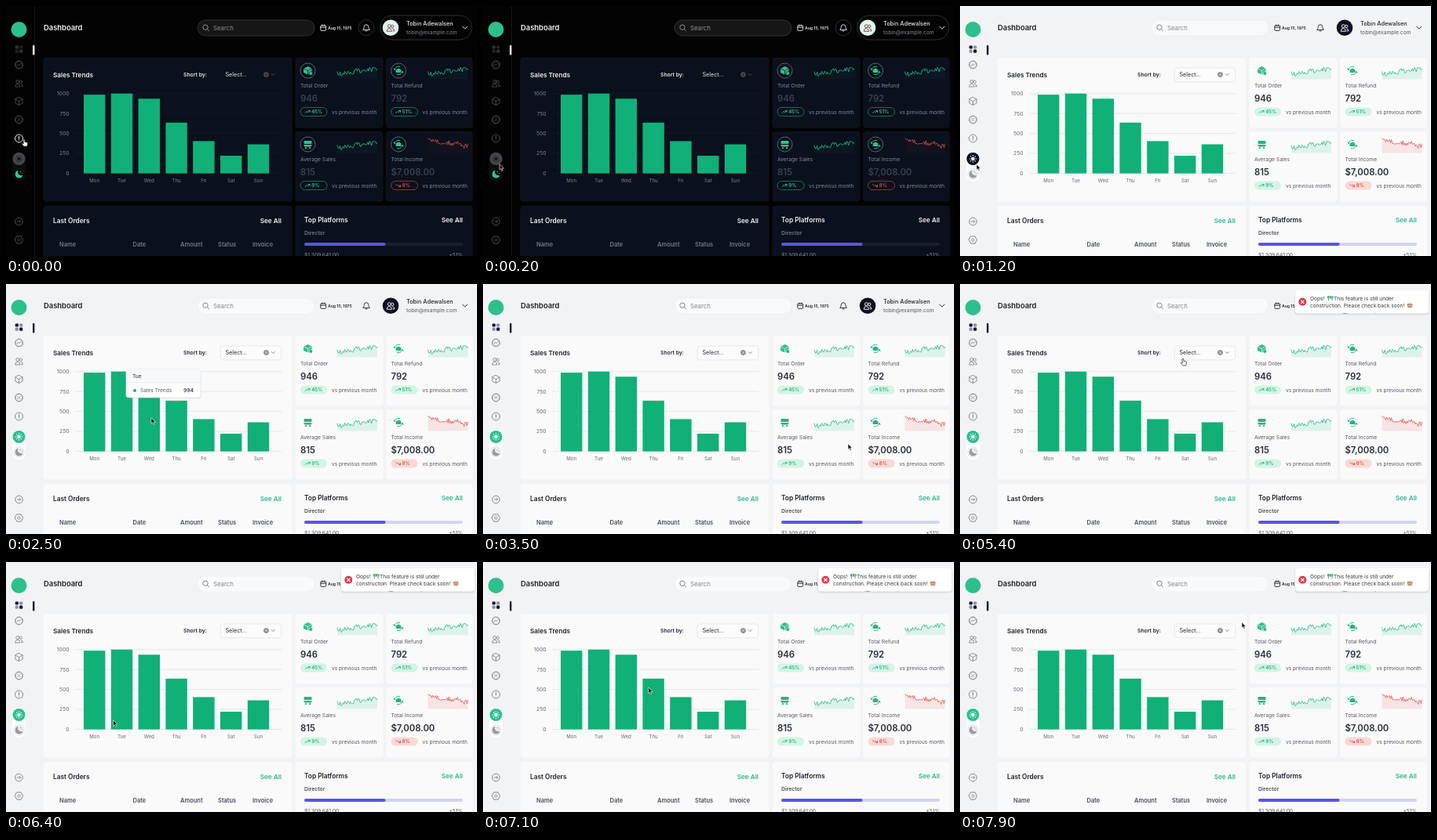
Animation, 600 px wide and 319 px high, one loop 8 s. Source, as an HTML page:

```html
<!DOCTYPE html>
<html lang="en">
<head>
<meta charset="utf-8">
<title>Dashboard</title>
<style>
html, body { margin: 0; width: 100%; height: 100%; overflow: hidden; }
svg { display: block; width: 100%; height: 100%; font-family: Inter, "Open Sans", sans-serif;
  --bg: #f2f3f5; --card: #fafafb; --edge: #fafafb; --ink: #23262f; --title: #1f2229; --sub: #55585f;
  --num: #2a2d3c; --axis: #666a70; --head: #4a4e57; --link: #2db88c; --grid: #e2e4e7; --icon: #85888d;
  --line: transparent; --field: #f9fafb; --fieldEdge: #eeeff1; --hint: #85888e; --ring: transparent;
  --pick: #fcfcfd; --pickEdge: #e2e4e8; --up: #22b582; --upBg: #d3f4e6; --upEdge: transparent;
  --down: #dc5145; --downBg: #f9d9d5; --downEdge: transparent; --fade: .13; --track: #d3d3f2;
  --avatar: #0e1022; --face: #fff; --tabA: #14162b; --tabB: #8e8fa8; --mark: #14162b;
  --pill: #fff; --sunBg: #2cc08d; --sun: #fff; --moon: #9a9ca0; --moonBg: #eeeef0; --hot: #85888d; }
svg.dark {
  --bg: #030304; --card: #0a101c; --edge: #121824; --ink: #e8e9ec; --title: #f0f1f3; --sub: #858a94;
  --num: #3a404e; --axis: #7d828c; --head: #737985; --link: #f0f1f3; --grid: #151b27; --icon: #4a4b4d;
  --line: #1d1d1e; --field: #161617; --fieldEdge: #39393a; --hint: #8b8c8f; --ring: #737780;
  --pick: transparent; --pickEdge: transparent; --up: #27c78e; --upBg: transparent; --upEdge: #1c8763;
  --down: #d8574c; --downBg: transparent; --downEdge: #a3423c; --fade: .04; --track: #1a1e2a;
  --avatar: #dff6ec; --face: #843c46; --tabA: #303133; --tabB: #202123; --mark: #f2f2f2;
  --pill: #0c0c0d; --sunBg: #454648; --sun: #17181a; --moon: #2cc892; --moonBg: transparent; --hot: #f0f0f0; }
</style>
</head>
<body>
<svg id="stage" viewBox="0 0 600 319" preserveAspectRatio="none"></svg>
<script>
const col = c => /^[a-z]+$/i.test(c) && c !== 'none' ? `var(--${c})` : c;
const paint = (fill, stroke = 'none', w = 1) =>
  `style="fill:${col(fill)};stroke:${col(stroke)};stroke-width:${w}"`;
const rect = (x, y, w, h, r, ...p) =>
  `<rect x="${x}" y="${y}" width="${w}" height="${h}" rx="${r}" ${paint(...p)}/>`;
const circle = (x, y, r, ...p) => `<circle cx="${x}" cy="${y}" r="${r}" ${paint(...p)}/>`;
const path = (d, ...p) => `<path d="${d}" stroke-linecap="round" stroke-linejoin="round" ${paint(...p)}/>`;
const text = (x, y, size, fill, str, weight = 400, anchor = 'start') =>
  `<text x="${x}" y="${y}" font-size="${size}" font-weight="${weight}" text-anchor="${anchor}" ${paint(fill)}>${str}</text>`;
const at = (x, y, body) => `<g transform="translate(${x} ${y})">${body}</g>`;
const chevron = (x, y, s, c) => path(`M${x - s} ${y - s / 2}l${s} ${s} ${s} ${-s}`, 'none', c, 1);

// Outline icons, centred on 0,0
const scallop = c => circle(0, 0, 4.6, 'none', c, 1) + circle(0, 0, 5.1, 'none', c, .5);
const users = c => circle(-1.7, -2, 2, 'none', c, .9) + circle(2.2, -1.8, 1.7, 'none', c, .9) +
  path('M-4.8 4.2q0-3.4 3.1-3.4t3.1 3.4zM2.6 1.2q2.4.4 2.3 3H3', 'none', c, .9);
const box = c => path('M0-5L4.6-2.6V2.6L0 5-4.6 2.6V-2.6ZM-4.6-2.6L0 0 4.6-2.6M0 0V5', 'none', c, .9);
const icons = {
  chart: c => scallop(c) + path('M-2.5 1.3L-.8-.8 .7.6 2.5-1.5', 'none', c, .9),
  users, box,
  percent: c => scallop(c) + path('M-1.7 1.7L1.7-1.7', 'none', c, .9) +
    circle(-1.4, -1.3, .6, c) + circle(1.4, 1.3, .6, c),
  clock: c => circle(0, 0, 5, 'none', c, 1) + path('M0-2.6V.4M0 2.1V2.2', 'none', c, 1.1),
  arrow: c => circle(0, 0, 4.8, 'none', c, 1) + path('M-2.2 0H2.2M.6-1.7L2.3 0 .6 1.7', 'none', c, .9),
  gear: c => path('M-2.6-4.6H2.6L5.2 0 2.6 4.6H-2.6L-5.2 0Z', 'none', c, 1) + circle(0, 0, 1.7, 'none', c, .9)
};

function sidebar() {
  let out = rect(36, 0, .8, 319, 0, 'line') + circle(16.5, 30, 10, '#2ec08c');
  for (let i = 0; i < 4; i++)
    out += rect(11.7 + i % 2 * 5.4, 50.4 + (i >> 1) * 5.2, 4.2, 4.2, 1.3, i % 3 ? 'tabB' : 'tabA');
  out += rect(34, 50, 2.4, 12.5, 1, 'mark');
  const items = [['chart', 75], ['users', 98.5], ['box', 121.5], ['percent', 145], ['arrow', 275], ['gear', 298.5]];
  for (const [name, y] of items) out += at(16.5, y, icons[name]('icon'));
  out += `<g id="clock">${at(16.5, 169, icons.clock('icon'))}</g><g id="clockHot">${at(16.5, 169, icons.clock('hot'))}</g>`;
  out += rect(8, 186, 17, 38, 8.5, 'pill') + `<g id="sunBtn">${circle(16.5, 195, 8, 'sunBg')}</g>` +
    `<g id="sunDown">${circle(16.5, 195, 8, '#0e1022')}</g>` + circle(16.5, 214.5, 7.5, 'moonBg');
  let rays = circle(0, 0, 2.3, 'sun');
  for (let a = 0; a < 8; a++)
    rays += `<g transform="rotate(${a * 45})">${path('M0-3.6V-4.3', 'none', 'sun', 1)}</g>`;
  return out + at(16.5, 195, rays) +
    at(16.5, 214.5, path('M-.8-4.8A4.9 4.9 0 1 0 4.9 1.2 4.3 4.3 0 0 1-.8-4.8Z', 'moon') +
      circle(2, -3, .7, 'moon') + circle(4.2, -1, .6, 'moon'));
}

function header() {
  return text(48, 31.3, 9.4, 'title', 'Dashboard', 600) +
    rect(244, 18, 149, 20, 10, 'field', 'fieldEdge', .8) +
    circle(254, 27.2, 3.2, 'none', 'hint', 1) + path('M256.5 29.7L258.6 31.8', 'none', 'hint', 1) +
    text(264, 30.8, 7.8, 'hint', 'Search') +
    rect(400.8, 24.8, 6.8, 6.6, 1.2, 'none', 'ink', .9) + path('M401 27.2H407.4M402.8 24V25.4M405.6 24V25.4', 'none', 'ink', .9) +
    text(410, 29.8, 5.1, 'ink', 'Aug 15, 1975', 600) +
    circle(459, 27.7, 10, 'none', 'fieldLine', .8) +
    path('M455 30.2Q456.2 29 456.2 26.6 456.2 23.8 459 23.8T461.8 26.6Q461.8 29 463 30.2ZM458 31.9H460', 'none', 'ink', .9) +
    `<g class="night">${rect(476.5, 12, 117, 31, 15.5, 'none', '#3a3a3b', .8) + circle(459, 27.7, 10, 'none', '#3a3a3b', .8)}</g>` +
    circle(490, 27.7, 10.3, 'avatar') + at(490, 27.7, users('face')) +
    text(510, 25, 7.3, 'ink', 'Tobin Adewalsen', 500) + text(510, 35.8, 6.7, 'sub', 'tobin@example.com') +
    chevron(584.7, 27.7, 3, 'ink');
}

const days = ['Mon', 'Tue', 'Wed', 'Thu', 'Fri', 'Sat', 'Sun'];
const sales = [980, 994, 930, 632, 402, 220, 362];
const step = 34.8;

function chart() {
  let out = rect(48, 66.5, 316, 182.5, 3, 'card', 'edge', .8) +
    text(60, 90.8, 8.2, 'title', 'Sales Trends', 600) +
    text(226, 90, 6.8, 'ink', 'Short by:', 600) +
    rect(273.3, 79, 77.5, 17.8, 3, 'pick', 'pickEdge', .8) +
    text(279.5, 90, 7.2, 'ink', 'Select...') +
    circle(331.5, 87.6, 3.3, 'icon') + path('M330.3 86.4l2.4 2.4m0-2.4l-2.4 2.4', 'none', 'card', .8) +
    chevron(340.3, 87.6, 2, 'icon');
  for (let i = 0; i < 5; i++) {
    const y = 213.4 - i * 25.4;
    out += path(`M88.5 ${y}H351`, 'none', 'grid', .8) + text(80.5, y + 2.4, 6.8, 'axis', i * 250, 400, 'end');
  }
  days.forEach((d, i) => {
    const x = 99 + i * step, h = sales[i] * .1025;
    out += rect(x, 213.6 - h, 27.4, h, 0, '#10b078') + text(x + 13.7, 225, 6.2, 'axis', d, 400, 'middle');
  });
  return out;
}

function spark(x, y, rising, seed) {
  const n = 42, c = rising ? 'up' : 'down';
  let d = '';
  for (let i = 0; i <= n; i++) {
    seed = seed * 16807 % 2147483647;
    const trend = rising ? 13 - 6.5 * i / n : 4 + 7 * i / n;
    const v = trend + (seed / 2147483647 - .5) * 6 + Math.sin(i * .55);
    d += `${i ? 'L' : 'M'}${(x + i * 51 / n).toFixed(1)} ${(y + v).toFixed(1)}`;
  }
  return `<g style="opacity:var(--fade)">${path(`${d}V${y + 20}H${x}Z`, c)}</g>` + path(d, 'none', c, .75);
}

const badges = {
  box: path('M-5.5-2.5L0-5.5 5-3V2.2L0 5-5.5 2.4Z', '#35bd8d') + path('M-5.5-2.5L0 0 5-3M0 0V5', 'none', 'card', .7) + circle(3.8, 3.5, 2.3, 'up', 'card', .6),
  refund: path('M-5-1A5 5 0 0 1 1.5-5M5 1A5 5 0 0 1-1.5 5M-5-1l-1-2M5 1l1 2', 'none', 'up', 1) + path('M-3.4-1.2L0-3 3.4-1.2V2.4H-3.4Z', 'up'),
  cart: rect(-5, -4.6, 10, 4, 1, 'up') + path('M-5.4.4H5.2L4.2 3H-4.2Z', 'up') + circle(-2.6, 4.7, 1.1, 'up') + circle(2.6, 4.7, 1.1, 'up')
};

function stat(x, y, w, name, value, pct, badge, seed, rising = true) {
  const c = rising ? 'up' : 'down', px = x + 6, py = y + 63;
  const arrow = rising ? 'M0 3l2-2 1.3 1.2L6 0M4 0H6V2' : 'M0 0l2 2 1.3-1.2L6 3M4 3H6V1';
  return rect(x, y, w, 88.5, 3, 'card', 'edge', .8) +
    circle(x + 15.5, y + 16, 9.5, 'none', 'ring', .8) + at(x + 15.5, y + 16, badges[badge]) +
    spark(x + 53, y + 7, rising, seed) +
    text(px, y + 37, 6.7, 'sub', name) + text(px, y + 55.8, 11.3, 'num', value, 600) +
    rect(px, py, 34, 11, 5.5, c + 'Bg', c + 'Edge', .8) +
    at(px + 6, py + 4, path(arrow, 'none', c, .9)) + text(px + 14.3, py + 7.8, 6.1, c, pct, 600) +
    text(px + 40, py + 8, 6.6, 'sub', 'vs previous month');
}

function bottom() {
  let out = rect(48, 255.5, 316, 90, 3, 'card', 'edge', .8) + rect(369, 255.5, 225, 90, 3, 'card', 'edge', .8) +
    text(60, 277.2, 8.3, 'title', 'Last Orders', 600) + text(351, 277.2, 8.2, 'link', 'See All', 600, 'end') +
    text(380, 276, 8.3, 'title', 'Top Platforms', 600) + text(582, 276, 8.2, 'link', 'See All', 600, 'end');
  const heads = { Name: 68, Date: 161.5, Amount: 222, Status: 270, Invoice: 314 };
  for (const k in heads) out += text(heads[k], 306.6, 7.5, 'head', k, 600);
  return out + text(380, 292.3, 6.8, 'head', 'Director', 600) +
    rect(380, 302, 202, 4, 2, 'track') + rect(380, 302, 103.5, 4, 2, '#5a55e3') +
    text(380, 320, 6.7, 'sub', '$1,309,641.00') + text(582, 320, 6.7, 'sub', '+51%', 400, 'end');
}

const tip = rect(0, 1, 95.5, 36.5, 3, '#0001') + rect(0, 0, 95, 36, 3, '#fff', '#e3e5e8', .7) +
  rect(.4, .4, 94.2, 16.6, 3, '#f8f9fa') + path('M0 17H95', 'none', '#e3e5e8', .7) +
  `<text id="tipDay" x="8" y="11.4" font-size="6.7" fill="#2b2e35"></text>` +
  circle(11, 27, 2, '#10b078') + text(18, 29.4, 6.6, '#55585f', 'Sales Trends') +
  `<text id="tipVal" x="86" y="29.4" font-size="6.8" font-weight="500" text-anchor="end" fill="#2b2e35"></text>`;

const toast = rect(426, 9, 172, 31, 4, '#0000000d') + rect(426.6, 8.6, 170.8, 30, 4, '#0000000f') +
  rect(427, 8, 170, 29.5, 4, '#fff') + circle(436.3, 22.8, 5, '#e2364a') +
  path('M434.5 21l3.6 3.6m0-3.6l-3.6 3.6', 'none', '#fff', 1.1) +
  text(446, 20.8, 6.6, '#363636', 'Oops!') +
  rect(468, 15.2, 7.4, 3.4, .5, '#39ad69') + path('M469.5 18.6V21M474 18.6V21', 'none', '#4c8f62', .8) +
  path('M470 18.2l1.2-2.6M473 18.2l1.2-2.6', 'none', '#e9f4da', .7) +
  text(476, 20.8, 6.6, '#363636', 'This feature is still under') +
  text(446, 30, 6.6, '#363636', 'construction. Please check back soon!') +
  rect(569.5, 24.5, 7, 6, 2, '#d9b59b') + path('M570 26.2H576M571.5 28.8H574.6', 'none', '#98644d', .8);

const arrowCursor = path('M0 0V7.2L1.7 5.7 2.9 8.4 4.2 7.8 3 5.2H5.2Z', '#111', '#fff', .6);
const handCursor = path('M-.9.6Q0-.6.9.6V3.4L4 4.1Q4.8 4.4 4.6 5.4L3.9 9H-.4L-3 5.8Q-2.8 4.6-.9 5.6Z', '#fff', '#222', .7);

const stage = document.getElementById('stage');
stage.innerHTML = rect(0, 0, 600, 319, 0, 'bg') + sidebar() + header() + chart() +
  stat(369, 66.5, 111, 'Total Order', '946', '45%', 'box', 7919) +
  stat(484.5, 66.5, 109.5, 'Total Refund', '792', '51%', 'refund', 7919) +
  stat(369, 160.5, 111, 'Average Sales', '815', '9%', 'cart', 7919) +
  stat(484.5, 160.5, 109.5, 'Total Income', '$7,008.00', '8%', 'refund', 4243, false) +
  bottom() + `<g id="tip">${tip}</g><g id="toast">${toast}</g>` +
  `<g id="cursor"><g id="arrow">${arrowCursor}</g><g id="hand">${handCursor}</g></g>`;

const $ = id => document.getElementById(id);
const show = (el, on) => el.style.display = on ? '' : 'none';
const move = (el, x, y) => el.setAttribute('transform', `translate(${x} ${y})`);
const night = stage.querySelector('.night');

// Pointer stops: time, x, y
const stops = [[0, 23, 170], [200, 21, 202], [1700, 21, 202], [2500, 185, 171], [3500, 465, 204],
  [4000, 337, 272], [4500, 337, 272], [5300, 284, 95], [5600, 284, 95], [6400, 136.5, 202],
  [6800, 136.5, 202], [7700, 359, 77], [8000, 359, 77]];

function pointer(t) {
  const i = Math.max(1, stops.findIndex(s => s[0] > t));
  const [t0, x0, y0] = stops[i - 1], [t1, x1, y1] = stops[i];
  const u = (t - t0) / (t1 - t0);
  return [x0 + (x1 - x0) * u, y0 + (y1 - y0) * u];
}

function draw(now) {
  const t = Math.floor(now % 8000 / 100) * 100;
  const dark = t < 1200;
  stage.classList.toggle('dark', dark);
  show(night, dark);
  show($('clock'), t >= 100);
  show($('clockHot'), t < 100);
  show($('sunDown'), t >= 1200 && t < 1800);

  const [x, y] = pointer(t);
  move($('cursor'), x, y);
  const hand = t < 200 || (t >= 3900 && t < 4600) || (t >= 5200 && t < 5700);
  show($('hand'), hand);
  show($('arrow'), !hand);

  // The tooltip trails the pointer
  const late = pointer(Math.max(0, t - 200))[0];
  const day = Math.floor((late - 95.5) / step);
  const hover = t >= 2000 && t < 3100 && day >= 0 && day < 7;
  show($('tip'), hover);
  if (hover) {
    move($('tip'), Math.min(late + 9, 256), 109);
    $('tipDay').textContent = days[day];
    $('tipVal').textContent = sales[day];
  }

  const k = Math.min(1, Math.max(0, (t - 4100) / 300));
  show($('toast'), k > 0);
  move($('toast'), 0, -50 * (1 - k) ** 3);
}

function loop(now) {
  draw(now);
  requestAnimationFrame(loop);
}
draw(0);
requestAnimationFrame(loop);
</script>
</body>
</html>
```
